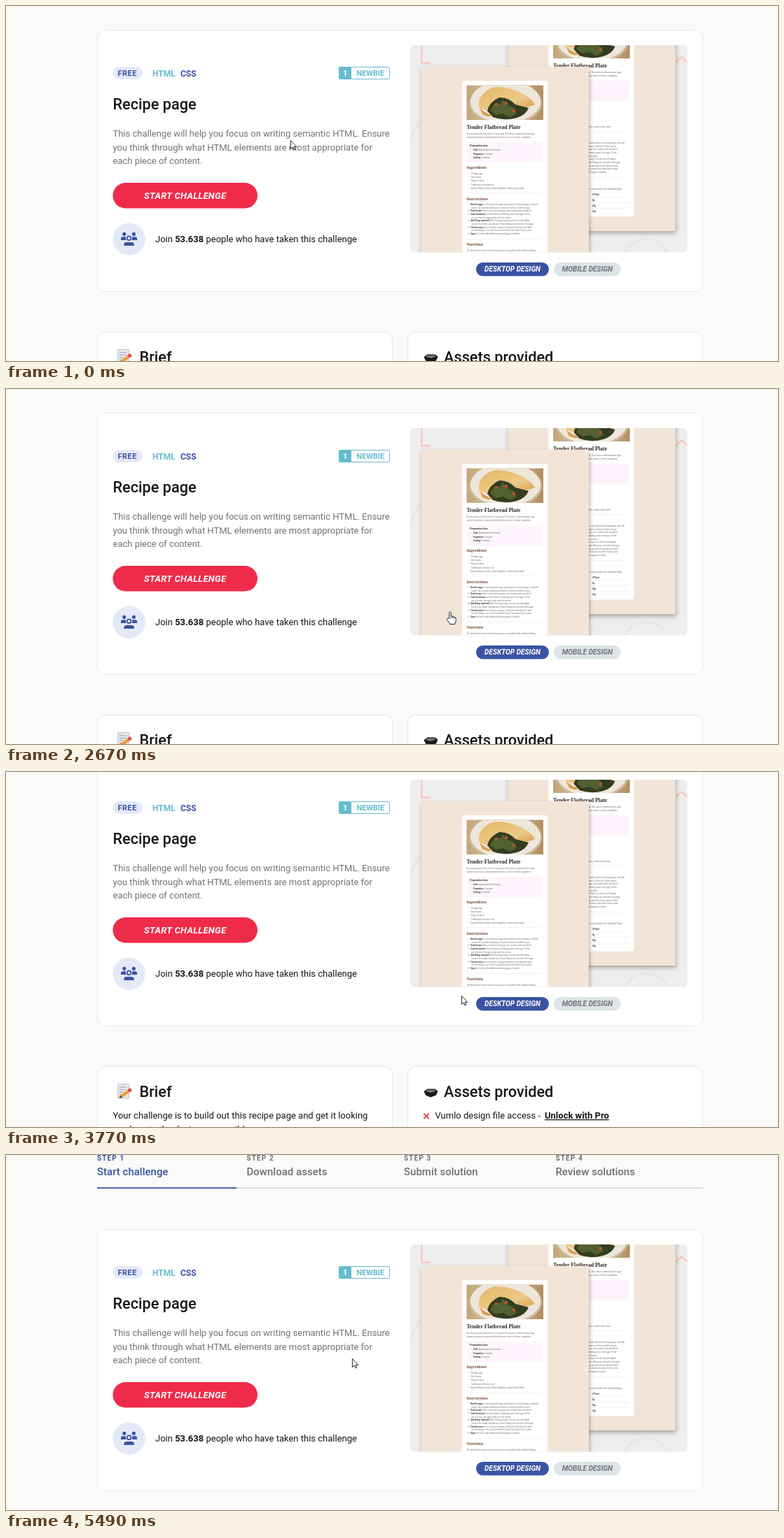
Animation of 1102x508 px, one loop 6.15 s. Source, as an HTML page:

```html
<!DOCTYPE html>
<html lang="en">
<head>
<meta charset="utf-8">
<title>Recipe page challenge</title>
<style>
html, body { margin: 0; height: 100%; overflow: hidden; background: #fafaf8; }
svg { display: block; width: 100vw; height: 100vh; }
text { font: 13px Roboto, sans-serif; fill: #17151b; white-space: pre; }
.card { fill: #fff; stroke: #e2e6ed; }
.title { font-size: 21.7px; font-weight: 500; }
.muted { fill: #727176; }
.tag { font-weight: 700; font-size: 12px; }
.small { font-size: 11px; letter-spacing: .5px; }
.cta { font-weight: 700; font-style: italic; fill: #fff; }
.start { letter-spacing: .3px; text-anchor: middle; }
.pill { font-size: 10.1px; text-anchor: middle; }
.step { font-weight: 700; font-size: 10px; letter-spacing: 1.1px; }
.stage { font-weight: 500; font-size: 15px; }
.steps text { fill: #707075; }
.steps .on { fill: #3a54a3; }
.blue { fill: #3a54a3; }
.teal { fill: #66bccf; }
.pale { fill: #e5e9f7; }
.bold { font-weight: 700; }
.paper { filter: drop-shadow(1px 3px 3px rgba(50, 40, 35, .38)); }
.recipe text { font-size: 2.72px; fill: #756b68; }
.recipe .name, .recipe .head { font-family: "Liberation Serif", serif; font-weight: 700; }
.recipe .name { font-size: 7.8px; fill: #332925; }
.recipe .head { font-size: 5.9px; fill: #7a5040; }
.recipe .strong { font-weight: 700; fill: #3b302d; }
.recipe .label { font-size: 3.4px; }
.rule { stroke: #ebe6e2; stroke-width: .5; }
#cursor > * { stroke-linejoin: round; }
</style>
</head>
<body>
<svg viewBox="0 0 1102 508">
  <defs>
    <clipPath id="preview"><rect x="577" y="56" width="395.5" height="296.5" rx="6"/></clipPath>
    <clipPath id="photo"><rect x="657.5" y="113.5" width="109.5" height="49.5"/></clipPath>
    <linearGradient id="table"><stop stop-color="#c4a57a"/><stop offset=".5" stop-color="#d9c6a8"/><stop offset="1" stop-color="#b18d5f"/></linearGradient>
    <linearGradient id="crust" x2="1" y2="1"><stop stop-color="#e3b765"/><stop offset=".6" stop-color="#edca86"/><stop offset="1" stop-color="#d39a4b"/></linearGradient>

    <g id="recipe" class="recipe">
      <rect class="paper" x="593" y="87" width="239" height="323" fill="#f2e5d8"/>
      <rect x="651" y="107" width="122" height="282.5" rx="4" fill="#fff"/>
      <g clip-path="url(#photo)">
        <rect x="657" y="113" width="111" height="51" fill="url(#table)"/>
        <ellipse cx="713" cy="139" rx="52" ry="31" fill="#cbb99e"/>
        <ellipse cx="713" cy="137" rx="50" ry="30" fill="#eee6da"/>
        <path d="M676 146C671 133 684 117 701 116C721 116 748 127 755 141Q741 147 728 145L705 135Q690 140 688 150Z" fill="url(#crust)"/>
        <path d="M687 150Q690 137 704 131Q717 130 727 141L746 146Q742 156 729 160Q711 165 695 159Z" fill="#333d20"/>
        <path d="M691 149l7-10 7 1 4-6 7 8 9 4 4 8-10 5-9-5-11 2z" fill="#53602f"/>
        <path d="M676 146Q683 153 695 157Q687 160 680 155Z" fill="#d99f4d"/>
        <g fill="#bd5530"><circle cx="700" cy="141" r="2"/><circle cx="714" cy="139" r="2.2"/><circle cx="725" cy="150" r="2.2"/></g>
      </g>
      <text class="name" x="657.5" y="175.5">Tender Flatbread Plate</text>
      <text x="657.5" y="183.7">An easy and quick dish, perfect for any meal. This classic combines beaten eggs</text>
      <text x="657.5" y="188.6">cooked to perfection, optionally filled with your choice of cheese, vegetables.</text>
      <rect x="657.5" y="194.5" width="108" height="29.5" rx="2" fill="#fdf5fb"/>
      <text class="strong label" x="662" y="201">Preparation time</text>
      <text x="664" y="207">•   <tspan class="strong">Total:</tspan> Approximately 10 minutes</text>
      <text x="664" y="212.5">•   <tspan class="strong">Preparation:</tspan> 5 minutes</text>
      <text x="664" y="217.8">•   <tspan class="strong">Cooking:</tspan> 5 minutes</text>
      <text class="head" x="657.5" y="233">Ingredients</text>
      <text x="659" y="240.5">•     2-3 large eggs</text>
      <text x="659" y="246">•     Salt, to taste</text>
      <text x="659" y="251.3">•     Pepper, to taste</text>
      <text x="659" y="256.6">•     1 tablespoon of butter or oil</text>
      <text x="659" y="262">•     Optional fillings: cheese, diced vegetables, cooked meats, herbs</text>
      <path class="rule" d="M657.5 267.5H766"/>
      <text class="head" x="657.5" y="277.5">Instructions</text>
      <text x="659" y="285">1    <tspan class="strong">Beat the eggs:</tspan> In a bowl, beat the eggs with a pinch of salt and pepper, until well</text>
      <text x="664.5" y="289.7">mixed. You can add a tablespoon of water or milk for a fluffier texture.</text>
      <text x="659" y="294.4">2    <tspan class="strong">Heat the pan:</tspan> Place a non-stick frying pan over medium heat and add oil.</text>
      <text x="659" y="299">3    <tspan class="strong">Cook the mixture:</tspan> Once the butter is bubbling, pour in the eggs. Tilt the</text>
      <text x="664.5" y="303.6">pan to ensure the eggs evenly coat the surface.</text>
      <text x="659" y="308.4">4    <tspan class="strong">Add fillings (optional):</tspan> When the eggs begin to set but are still slightly</text>
      <text x="664.5" y="313">runny in the middle, sprinkle your chosen fillings over one half of the eggs.</text>
      <text x="659" y="317.8">5    <tspan class="strong">Fold and serve:</tspan> As it continues cooking, carefully lift one edge and fold it</text>
      <text x="664.5" y="322.4">over the fillings. Let it cook for another minute, then slide it onto a plate.</text>
      <text x="659" y="327.2">6    <tspan class="strong">Enjoy:</tspan> Serve hot, with additional salt and pepper if needed.</text>
      <path class="rule" d="M657.5 333.5H766"/>
      <text class="head" x="657.5" y="343">Nutrition</text>
      <text x="657.5" y="351">The table below shows nutritional values per serving without the additional fillings.</text>
      <text class="strong" x="713.5" y="358.5">277kcal</text>
      <text class="strong" x="713.5" y="366.5">0g</text>
      <text class="strong" x="713.5" y="374.5">20g</text>
      <text class="strong" x="713.5" y="382.5">22g</text>
      <path class="rule" d="M657.5 361.5H766M657.5 369.5H766M657.5 377.5H766"/>
    </g>
  </defs>

  <rect width="1102" height="508" fill="#fafaf8"/>
  <g id="page">
    <g class="steps">
      <text class="step on" x="130" y="-64.5">STEP 1</text><text class="stage on" x="130" y="-43.5">Start challenge</text>
      <text class="step" x="343.5" y="-64.5">STEP 2</text><text class="stage" x="343.5" y="-43.5">Download assets</text>
      <text class="step" x="568" y="-64.5">STEP 3</text><text class="stage" x="568" y="-43.5">Submit solution</text>
      <text class="step" x="784.5" y="-64.5">STEP 4</text><text class="stage" x="784.5" y="-43.5">Review solutions</text>
      <rect x="130" y="-25.5" width="865" height="1.5" fill="#cfd3d8"/>
      <rect class="blue" x="130" y="-25.7" width="199" height="1.8"/>
    </g>

    <rect class="card" x="130.5" y="34.5" width="864" height="374" rx="11"/>
    <rect class="pale" x="152.5" y="87" width="42.5" height="18" rx="9"/>
    <text class="tag small blue" x="159.5" y="100">FREE</text>
    <text class="tag teal" x="209" y="100.5">HTML</text>
    <text class="tag blue" x="249" y="100.5">CSS</text>
    <rect x="475.5" y="87.5" width="72" height="17" rx="2" fill="#fff" stroke="#66bccf"/>
    <path class="teal" d="M477 87H493V105H477a2 2 0 0 1-2-2V89a2 2 0 0 1 2-2Z"/>
    <text class="tag" x="481" y="100" style="font-size:11px;fill:#fff">1</text>
    <text class="tag teal" x="500.5" y="100" style="font-size:10.9px">NEWBIE</text>

    <text class="title" x="152.5" y="148">Recipe page</text>
    <text class="muted" x="152.5" y="187">This challenge will help you focus on writing semantic HTML. Ensure</text>
    <text class="muted" x="152.5" y="206.5">you think through what HTML elements are most appropriate for</text>
    <text class="muted" x="152.5" y="226">each piece of content.</text>

    <rect x="152.5" y="253" width="206.5" height="36.5" rx="18.2" fill="#ee2c4a"/>
    <rect id="hover" x="152.5" y="253" width="206.5" height="36.5" rx="18.2" fill="#d40f2e" opacity="0"/>
    <text class="cta start" x="255.7" y="276">START CHALLENGE</text>

    <circle class="pale" cx="175.6" cy="333.6" r="23.1"/>
    <g class="blue">
      <circle cx="168.8" cy="326.3" r="2.6"/><circle cx="182.4" cy="326.3" r="2.6"/>
      <path d="M164 335v-1.5q0-3.2 3.2-3.2h2.6q.8 0 1.4.4-1.2 2.4.6 4.3zM187.2 335v-1.5q0-3.2-3.2-3.2h-2.6q-.8 0-1.4.4 1.2 2.4-.6 4.3z"/>
      <path d="M168.3 343v-1.2q0-3.8 3.8-3.8h7q3.8 0 3.8 3.8v1.2z"/>
      <circle cx="175.6" cy="332.3" r="2.9" fill="#e5e9f7" stroke="#3a54a3" stroke-width="1.7"/>
    </g>
    <text x="213" y="337.5">Join <tspan class="bold">53.638</tspan> people who have taken this challenge</text>

    <g clip-path="url(#preview)">
      <rect x="577" y="56" width="396" height="297" fill="#eee"/>
      <g fill="none" stroke="#e4e8e9" stroke-width="3">
        <circle cx="914" cy="366" r="33"/>
        <path d="M576 197Q580 179 593 165"/>
      </g>
      <path d="M593.3 56V81.5H605.5M956.5 80.5L964.5 73.5L972.5 80.5" fill="none" stroke="#f8cbc6" stroke-width="2.8"/>
      <use href="#recipe" x="123.5" y="-88"/>
      <use href="#recipe"/>
    </g>
    <rect class="blue" x="671" y="367" width="104" height="19.5" rx="9.75"/>
    <text class="cta pill" x="723" y="380.4">DESKTOP DESIGN</text>
    <rect x="782" y="367" width="95.5" height="19.5" rx="9.75" fill="#dbe4e7"/>
    <text class="cta pill" x="829.8" y="380.4" style="fill:#707279">MOBILE DESIGN</text>

    <rect class="card" x="130.5" y="466.5" width="421" height="300" rx="11"/>
    <rect class="card" x="573.5" y="466.5" width="421" height="300" rx="11"/>
    <path d="M159.5 491.5H175.5V512H159.5Z" fill="#e4e8ed" stroke="#b9c0c8" stroke-width=".8"/>
    <path d="M162 496H173M162 499.5H172M162 503H168M162 506.5H166" stroke="#9ba4ad"/>
    <path d="M164.5 509.5L177 500" stroke="#f39a32" stroke-width="4.6"/>
    <path d="M175 501.5L178.5 498.8" stroke="#e04458" stroke-width="4.8"/>
    <path d="M161.5 511.5L163 507.4L165.9 511.2Z" fill="#4a3c35"/>
    <text class="title" x="190.5" y="509.5">Brief</text>
    <path d="M596.5 502L602 498.5H612L616.5 501.5L614 507.5L606 510.5L599 507.5Z" fill="#19171c"/>
    <path d="M598.5 502L602.5 499.8H611.5L614 501.4L606.5 504Z" fill="#77747a"/>
    <text class="title" x="625" y="509.5">Assets provided</text>
    <text x="152.5" y="541">Your challenge is to build out this recipe page and get it looking</text>
    <text x="152.5" y="560.5">as close to the design as possible.</text>
    <path d="M596.3 533.7L604 541.4M604 533.7L596.3 541.4" stroke="#e3343f" stroke-width="1.7"/>
    <text x="612.5" y="541">Vumlo design file access -</text>
    <text class="bold" x="769" y="541" text-decoration="underline">Unlock with Pro</text>
    <path d="M595.8 564.3L599.4 567.8L606.6 560.4" fill="none" stroke="#2e62b5" stroke-width="1.8"/>
    <text x="614" y="568">JPEG design files for mobile &amp; desktop layouts</text>
  </g>

  <g id="cursor" fill="#fff" stroke="#111" stroke-width=".9">
    <path id="arrow" d="M.4.5V12.6L3.2 10L5 14L6.8 13.2L5.1 9.4H8.8Z"/>
    <g id="hand">
      <path d="M-1.3 9.8V1.3a1.3 1.3 0 0 1 2.6 0V6q1.8-.8 2.5.7 1.8-.7 2.4.8 2-.3 2 1.7v3.6c0 1.8-1.2 2.6-1.3 4.7H-.4c-.3-2.3-3.2-4.5-4.2-6.7-.6-1.5 1-2.5 2-1.4z"/>
      <path d="M1.3 6V9.2M3.8 6.7V9.4M6.2 7.5V9.6" fill="none"/>
    </g>
    <path id="beam" d="M-2.3-7.5H2.3M-2.3 7.5H2.3M0-7.5V7.5" fill="none"/>
  </g>
</svg>

<script>
const LOOP = 6150;
const $ = id => document.getElementById(id);

// Each move: start ms, end ms, number of jumps, evenly timed waypoints.
const cursorMoves = [
  [180, 450, 4, [[406, 192], [373, 226]]],
  [780, 1110, 6, [[373, 226], [329, 275]]],
  [1780, 2130, 6, [[329, 275], [330, 274], [352, 260], [382, 234], [410, 209], [430, 193], [438, 188]]],
  [2390, 2940, 8, [[438, 188], [550, 262], [634, 319], [645, 327], [650, 320]]],
  [4110, 4250, 3, [[650, 320], [402, 330]]],
  [4320, 4590, 5, [[402, 330], [362, 334], [345, 336], [334, 339], [328, 341], [326, 342]]],
  [5000, 5490, 8, [[326, 342], [350, 339], [417, 326], [474, 300], [494, 291]]],
];
const scrollMoves = [
  [3010, 3430, 7, [[0], [-4], [-16], [-36], [-53], [-64], [-70], [-72]]],
  [3700, 4120, 7, [[-72], [-66], [-45], [-10], [23], [50], [67], [72]]],
];

function sample(moves, t) {
  const move = moves.filter(m => t >= m[0]).pop();
  if (!move) return moves[0][3][0];
  const [start, end, jumps, path] = move;
  const done = Math.min(jumps, 1 + Math.floor((t - start) / (end - start) * (jumps - 1) + 1e-6));
  const at = done / jumps * (path.length - 1);
  const i = Math.min(Math.floor(at), path.length - 2);
  return path[i].map((v, axis) => v + (path[i + 1][axis] - v) * (at - i));
}

const ramp = (t, from, to) => Math.max(0, Math.min(1, (t - from) / (to - from)));
const inside = (x, y, [left, top, right, bottom]) => x > left && x < right && y > top && y < bottom;
const links = [[152, 253, 359, 290], [577, 56, 972, 352]];
const textLines = [[152, 176, 548, 190], [152, 195, 523, 209], [152, 215, 280, 229]];

function draw() {
  const t = performance.now() % LOOP;
  const [x, y] = sample(cursorMoves, t);
  const [scroll] = sample(scrollMoves, t);
  const over = areas => areas.some(area => inside(x, y - scroll, area));
  const shape = over(links) ? 'hand' : over(textLines) ? 'beam' : 'arrow';

  $('page').setAttribute('transform', `translate(0 ${scroll})`);
  $('cursor').setAttribute('transform', `translate(${x} ${y})`);
  for (const id of ['arrow', 'hand', 'beam']) $(id).style.display = id === shape ? '' : 'none';
  $('hover').setAttribute('opacity',
    ramp(t, 960, 1110) - ramp(t, 1930, 2130) + ramp(t, 4370, 4590) - ramp(t, 5140, 5340));
  requestAnimationFrame(draw);
}
draw();
</script>
</body>
</html>
```
